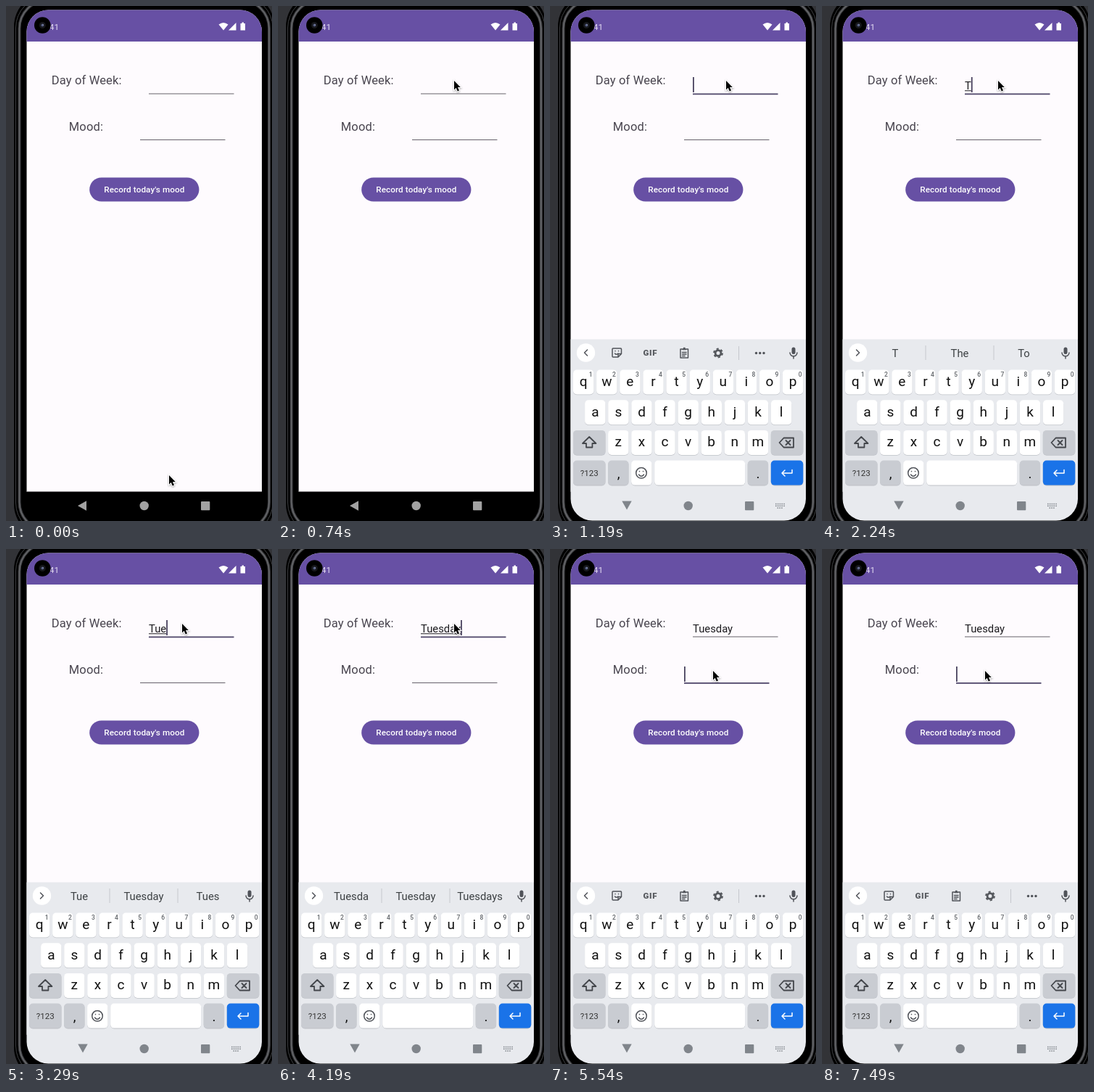
Write an HTML page that moves like this. It is 367 by 710 pixels and loops after 8 s.

```html
<!DOCTYPE html>
<html lang="en">
<head>
<meta charset="utf-8">
<title>Mood recorder</title>
<style>
  html, body { margin: 0; width: 100%; height: 100%; overflow: hidden; background: #323337; }
  svg { display: block; width: 367px; height: 710px; font-family: Roboto, sans-serif; }
  .line { fill: none; stroke: #505359; stroke-width: 1.5; stroke-linejoin: round; stroke-linecap: round; }
  .bold { stroke-width: 1.8; stroke: #44474c; }
  .mid { text-anchor: middle; }
  .label { font-size: 16.5px; letter-spacing: .16px; fill: #49454f; }
  .entry { font-size: 14.8px; fill: #1c1b1f; }
  .letter { font-size: 19px; fill: #111; }
  .digit { font-size: 8.5px; font-weight: 500; fill: #5f6368; }
  .word { font-size: 14.8px; fill: #3c4043; }
  .divider { stroke: #c6c8cd; }
</style>
</head>
<body>
<svg viewBox="0 0 367 710">
  <defs>
    <clipPath id="screen"><rect x="28.5" y="5.5" width="324.5" height="704" rx="30"/></clipPath>
  </defs>

  <!-- Phone body -->
  <rect width="367" height="710" fill="#323337"/>
  <rect x="11" y="-18" width="359.5" height="751" rx="46"/>
  <rect x="13.5" y="-13" width="354.5" height="741" rx="43" fill="none" stroke="#3f4043"/>
  <rect x="18.5" y="-8" width="344.5" height="731" rx="39" fill="none" stroke="#3c3d40" stroke-width="4"/>
  <rect x="18.5" y="-8" width="344.5" height="731" rx="39" fill="none" stroke="#68696c" stroke-width="1.5"/>

  <g clip-path="url(#screen)">
    <rect x="28" y="5" width="326" height="665" fill="#fefbfe"/>
    <rect x="28" y="5" width="326" height="44" fill="#6750a4"/>
    <rect x="28" y="669.5" width="326" height="41"/>

    <!-- Status bar -->
    <text x="59.8" y="33" font-size="11.8" fill="#e4dcf3">41</text>
    <g fill="#fff">
      <path d="M293.5 25.5Q300 20.5 306.5 25.5L300 33.5Z"/>
      <path d="M317.5 23V33.5H307Z"/>
      <path d="M323.5 24h2v-1.5h2.5v1.5h2v9.5h-6.5z"/>
    </g>

    <!-- Form -->
    <text class="label" x="62.7" y="108">Day of Week:</text>
    <text class="label" x="86.8" y="172">Mood:</text>
    <rect id="dayLine" x="197" width="117.5"/>
    <rect id="moodLine" x="185" width="117.5"/>
    <text id="day" class="entry" x="197" y="115"></text>
    <rect id="dayUnderline" x="197" y="116.3" height="1" fill="#1c1b1f"/>
    <rect id="caret" width="1.8" height="21" fill="#49425f"/>
    <rect x="115.2" y="236.5" width="151.2" height="33" rx="16.5" fill="#6750a4"/>
    <text class="mid" x="190.9" y="257.4" font-size="11.7" font-weight="500" letter-spacing=".1" fill="#fff">Record today's mood</text>

    <!-- Keyboard -->
    <g id="keyboard">
      <rect x="28" y="459.5" width="326" height="251" fill="#e8eaee"/>
      <circle cx="49.5" cy="478" r="12.7" fill="#fff"/>
      <path id="chevron" class="line"/>
      <g id="tools">
        <path class="line" d="M87 472h10.500q1 0 1 1v6.500l-4.500 4.500h-7q-1 0-1-1v-10q0-1 1-1zM98 479.500h-3q-1 0-1 1v3M89.500 479q2 2.500 4.500 0M90 475.500v.2M94.500 475.500v.2"/>
        <text class="mid" x="138.400" y="482" font-size="11.500" font-weight="900" letter-spacing=".8" fill="#55585d">GIF</text>
        <path class="line" d="M180 473h10.500v12h-10.500zM183 473.500h4.500M182.500 477.500h5.500M182.500 480h5.500M182.500 482.500h3.500M184.500 471.500h1.500"/>
        <g fill="none" stroke="#55585d">
          <circle cx="232" cy="478.5" r="3.9" stroke-width="2.8"/>
          <circle cx="232" cy="478.5" r="5.9" stroke-width="2" stroke-dasharray="3.1 3.08"/>
        </g>
        <path class="divider" d="M260.5 469v19"/>
        <g fill="#505359"><circle cx="284.5" cy="478.5" r="1.7"/><circle cx="289.7" cy="478.5" r="1.7"/><circle cx="295" cy="478.5" r="1.7"/></g>
      </g>
      <g id="suggestions">
        <path class="divider" d="M143 468v20M237 468v20"/>
        <text class="word mid" x="101" y="484"></text>
        <text class="word mid" x="190" y="484"></text>
        <text class="word mid" x="278.5" y="484"></text>
      </g>
      <rect x="333.5" y="470.5" width="5" height="9.5" rx="2.5" fill="#505359"/>
      <path class="line" d="M331 478q.5 4.800 5 4.800t5-4.800M336 483v3"/>
      <g id="keys"></g>
      <path class="line bold" d="M54.200 594l-9.200 9h5v5.500h8.400v-5.500h5z"/>
      <path class="line bold" d="M322.500 595.500h13.500v13h-13.500l-6-6.500zM325.500 599l6 6M331.500 599l-6 6"/>
      <circle class="line" cx="126" cy="643.8" r="7.3"/>
      <path class="line" d="M122.500 646q3.500 4.500 7 0M123.500 641.500v.3M128.500 641.500v.3"/>
      <path class="line" d="M334 639.500v4.500h-14M324 640l-4 4 4 4" style="stroke:#fff"/>
    </g>

    <!-- Navigation -->
    <g id="nav">
      <path id="back" d="M-6 0L6 -6.7V6.7Z"/>
      <circle cx="190.7" cy="689" r="6.2"/>
      <rect x="269" y="683" width="12.3" height="12.3" rx="1"/>
      <path id="switcher" d="M311 686.5h13M311 689.2h13M313.5 692h8" fill="none" stroke-width="1.5" stroke-dasharray="1.6 1.2"/>
    </g>
  </g>

  <!-- Camera -->
  <circle cx="50.3" cy="26.5" r="11.3"/>
  <circle cx="50.3" cy="26.5" r="4.5" fill="#17181c"/>
  <circle cx="50.3" cy="26.5" r="2" fill="#4c5478"/>
  <circle cx="51" cy="26" r=".8" fill="#a3a9c4"/>

  <path id="pointer" d="M0 0V12.4L2.700 9.800 4.700 14.400 7 13.400 5 8.900H8.800Z" stroke="#fff" stroke-width="2" paint-order="stroke" style="filter:drop-shadow(0 1px 1px #0005)"/>
</svg>

<script>
const $ = id => document.getElementById(id);
const LOOP = 8000, TICK = 150;

// Keys
const PITCH = 32.1, ROW = 41.7, GREY = '#c9ccd2';
const cap = (x, row, width, fill = '#fff') => {
  const y = 501.5 + row * ROW;
  const box = (top, color) =>
    `<rect x="${x}" y="${top}" width="${width}" height="34" rx="5" fill="${color}"/>`;
  return box(y + .8, '#bfc2c8') + box(y, fill);
};
const glyph = (text, x, y, type = 'letter') => `<text class="${type} mid" x="${x}" y="${y}">${text}</text>`;

let keys = '';
[['qwertyuiop', 46.2], ['asdfghjkl', 62.3], ['zxcvbnm', 94.3]].forEach(([letters, first], row) => {
  [...letters].forEach((letter, i) => {
    const x = first + i * PITCH;
    keys += cap(x - 14.2, row, 28.4) + glyph(letter, x, Math.round(524 + row * ROW));
    if (row === 0) keys += glyph((i + 1) % 10, x + 10, 511, 'digit');
  });
});
keys += cap(32, 2, 44.5, GREY) + cap(304.8, 2, 44.5, GREY)
  + cap(32, 3, 44.5, GREY) + cap(80.1, 3, 28.4, GREY) + cap(112.1, 3, 28.4)
  + cap(144.2, 3, 125) + cap(272.7, 3, 28.4, GREY) + cap(304.8, 3, 44.5, '#1a73e8')
  + '<text class="mid" x="54.2" y="648" font-size="11.5" fill="#333">?123</text>'
  + glyph(',', 94.5, 650.5) + glyph('.', 287, 650.5);
$('keys').innerHTML = keys;

// Timeline, measured in ticks
const WORD = 'Tuesday';
const typedAt = [14, 19, 21, 23, 25, 26, 28];
const suggestedAt = [15, 21, 22, 24, 25, 26, 29];
const DAY_FOCUS = 6, MOOD_FOCUS = 36, TOOLS_BACK = 37;
const caretOff = [[9, 12], [18, 19], [32, 35], [40, 44], [47, 50]];
const completions = [['The', 'To'], ['Tuesday', 'Tue'], ['Tuesday', 'Tues'], ['Tuesday', 'Tuesdays']];
const slots = $('suggestions').querySelectorAll('text');

const countUpTo = (times, tick) => times.filter(t => t <= tick).length;
const set = (id, attrs) => {
  for (const name in attrs) $(id).setAttribute(name, attrs[name]);
};
const ease = (tick, from, to) => {
  const p = Math.min(1, Math.max(0, (tick - from) / (to - from)));
  return p * p * (3 - 2 * p);
};

function drawLine(id, y, focused) {
  set(id, focused
    ? { y, height: 1.8, fill: '#50486b' }
    : { y, height: 1, fill: '#66626b' });
}

function drawSuggestions(tick) {
  const count = countUpTo(suggestedAt, tick);
  const visible = count > 0 && tick < TOOLS_BACK;
  $('suggestions').style.display = visible ? '' : 'none';
  $('tools').style.display = visible ? 'none' : '';
  set('chevron', { d: visible ? 'M47.5 474l4 4-4 4' : 'M51.5 474l-4 4 4 4' });
  if (!visible) return;
  const words = [WORD.slice(0, count), ...completions[Math.min(count, 4) - 1]];
  slots.forEach((slot, i) => slot.textContent = words[i]);
}

function drawForm(tick) {
  const onMood = tick >= MOOD_FOCUS;
  const onDay = tick >= DAY_FOCUS && !onMood;
  drawLine('dayLine', 120.5, onDay);
  drawLine('moodLine', 184, onMood);

  $('day').textContent = WORD.slice(0, countUpTo(typedAt, tick));
  const width = $('day').getComputedTextLength();
  set('dayUnderline', { width: onDay ? width : 0 });

  const blinkedOff = caretOff.some(([from, to]) => tick >= from && tick < to);
  $('caret').style.display = (onDay || onMood) && !blinkedOff ? '' : 'none';
  set('caret', onMood ? { x: 185, y: 162 } : { x: 197 + width, y: 98 });
}

function drawKeyboard(tick) {
  const shown = tick >= 7, settled = tick >= 8;
  const iconColor = settled ? '#80858b' : '#a2a2a2';
  $('keyboard').style.display = shown ? '' : 'none';
  set('keyboard', { opacity: settled ? 1 : .34, transform: `translate(0 ${settled ? 0 : 140.5})` });
  set('nav', { fill: iconColor });
  set('back', { transform: settled ? 'translate(106 688.5) rotate(-90)' : 'translate(105 689)' });
  set('switcher', { stroke: shown ? iconColor : 'none' });
}

function drawPointer(tick) {
  const up = ease(tick, 0, 5), down = ease(tick, 30, 35);
  const x = 225 + 18 * up - 18 * down;
  const y = 647 - 544 * up + 65 * down;
  set('pointer', { transform: `translate(${x} ${y})` });
}

function render(now) {
  const tick = Math.floor((now % LOOP + 10) / TICK);
  drawForm(tick);
  drawKeyboard(tick);
  drawSuggestions(tick);
  drawPointer(tick);
}

const start = performance.now();
(function loop() {
  render(performance.now() - start);
  requestAnimationFrame(loop);
})();
</script>
</body>
</html>
```
